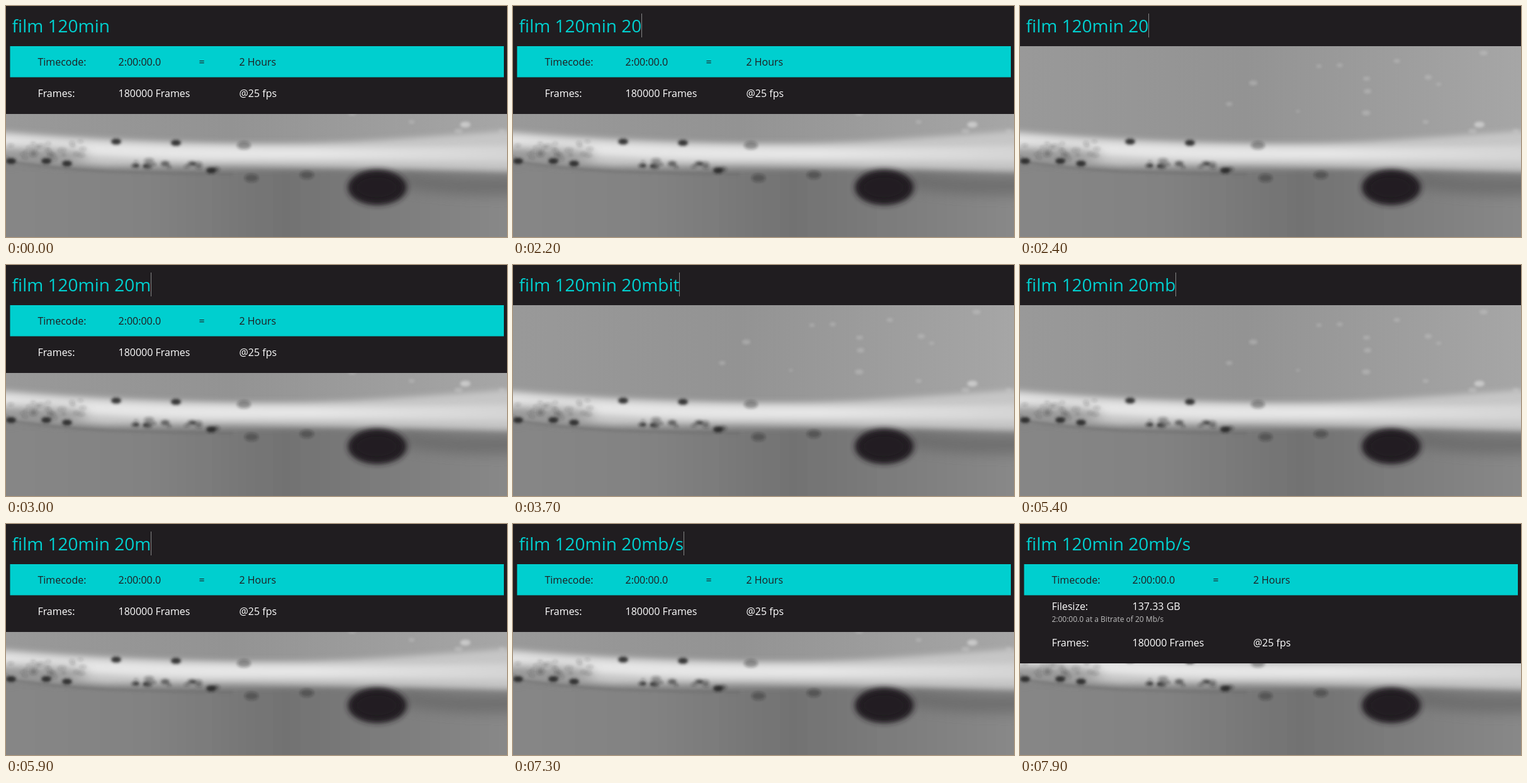
Animation, 796 px wide and 368 px high, one loop 8 s. Source, as an HTML page:

```html
<!DOCTYPE html>
<html lang="en">
<head>
<meta charset="utf-8">
<title>Film calculator</title>
<style>
  html, body { margin: 0; width: 100%; height: 100%; overflow: hidden; background: #201d20; }
  #stage { position: absolute; left: 0; top: 0; width: 796px; height: 368px; overflow: hidden;
           font-family: "Open Sans", "Noto Sans", sans-serif; }
  svg { position: absolute; left: 0; top: 0; display: block; }
  #query { position: absolute; left: 9.6px; top: 12px; height: 38px; line-height: 38px;
           font-size: 28px; white-space: pre; color: #00cfcf; }
  #caret { position: absolute; top: 0; width: 1px; height: 38px; background: #858585; }
  #rows text { font-size: 16px; fill: #fff; }
  #rows .picked text { fill: #201d20; }
  #rows .note { font-size: 12px; fill: #bdbdbd; }
</style>
</head>
<body>
<div id="stage">
  <svg width="796" height="368" viewBox="0 0 796 368">
    <defs>
      <linearGradient id="sky" x2="1" y2="0">
        <stop offset="0" stop-color="#999"/>
        <stop offset=".45" stop-color="#939393"/>
        <stop offset="1" stop-color="#a6a6a6"/>
      </linearGradient>
      <linearGradient id="ground" x2="1" y2="0">
        <stop offset="0" stop-color="#878787"/>
        <stop offset=".3" stop-color="#828282"/>
        <stop offset=".55" stop-color="#727272"/>
        <stop offset="1" stop-color="#8b8b8b"/>
      </linearGradient>
      <linearGradient id="core" x2="1" y2="0">
        <stop offset=".6" stop-color="#e6e6e6"/>
        <stop offset="1" stop-color="#d2d2d2"/>
      </linearGradient>
      <filter id="soft2" x="-50%" y="-50%" width="200%" height="200%"><feGaussianBlur stdDeviation="2"/></filter>
      <filter id="soft5" x="-50%" y="-50%" width="200%" height="200%"><feGaussianBlur stdDeviation="5"/></filter>
      <filter id="soft9" x="-50%" y="-80%" width="200%" height="260%"><feGaussianBlur stdDeviation="9"/></filter>
    </defs>

    <g id="photo">
      <rect width="796" height="368" fill="url(#sky)"/>
      <path d="M-40 246 Q180 262 400 260 T840 266 V410 H-40Z" fill="url(#ground)" filter="url(#soft5)"/>
      <path d="M630 264 Q720 276 840 270 V300 Q720 306 630 290Z" fill="#666" opacity=".7" filter="url(#soft9)"/>
      <path d="M-40 196 Q120 212 300 217 Q470 222 600 213 T840 196 V262 Q640 258 480 255 T160 254 Q60 246 -40 244Z"
            fill="#c6c6c6" filter="url(#soft5)"/>
      <path d="M-40 203 Q150 222 330 224 Q500 228 840 222 V248 Q560 244 330 245 Q150 244 -40 222Z"
            fill="url(#core)" filter="url(#soft5)"/>
      <ellipse cx="40" cy="239" rx="90" ry="11" fill="#777" opacity=".7" filter="url(#soft9)"/>
      <path d="M0 247 Q90 262 200 265 T360 268" fill="none" stroke="#666" stroke-width="3"
            opacity=".55" filter="url(#soft2)"/>
      <g id="pale" fill="#d2d2d2" filter="url(#soft2)"></g>
      <g id="dark" fill="#222" filter="url(#soft2)"></g>
      <ellipse cx="590" cy="289" rx="47" ry="28" fill="#201d20" filter="url(#soft5)"/>
      <ellipse cx="589" cy="289" rx="37" ry="21" fill="#201d20" filter="url(#soft5)"/>
    </g>

    <rect id="panel" width="796" fill="#201d20"/>
    <g id="rows">
      <g class="picked">
        <rect x="6.5" y="64" width="784.5" height="49.5" fill="#00cfcf"/>
        <text x="50.4" y="95">Timecode:</text>
        <text x="178.5" y="95">2:00:00.0</text>
        <text x="306.4" y="95">=</text>
        <text x="370.4" y="95">2 Hours</text>
      </g>
      <g id="size">
        <text x="50.4" y="137">Filesize:</text>
        <text x="178.5" y="137">137.33 GB</text>
        <text class="note" x="50.4" y="156">2:00:00.0 at a Bitrate of 20 Mb/s</text>
      </g>
      <g id="frames">
        <text x="50.4" y="145">Frames:</text>
        <text x="178.5" y="145">180000 Frames</text>
        <text x="370.4" y="145">@25 fps</text>
      </g>
    </g>
  </svg>
  <div id="query"><span id="typed"></span><span id="caret"></span></div>
</div>
<script>
const LOOP = 8000, BLINK = 500;
const $ = id => document.getElementById(id);

// Photo flecks
let seed = 7;
const random = () => (seed = seed * 16807 % 2147483647) / 2147483647;
const between = (a, b) => a + (b - a) * random();

function fleck(id, x, y, r, opacity) {
  const spot = document.createElementNS('http://www.w3.org/2000/svg', 'ellipse');
  const shape = { cx: x, cy: y, rx: r, ry: r * 0.6, opacity };
  for (const name in shape) spot.setAttribute(name, shape[name]);
  $(id).append(spot);
}

const lowerEdge = x => 243 + x * 0.045;
for (let i = 0; i < 26; i++) {
  const x = between(0, 130);
  fleck('dark', x, between(214, lowerEdge(x)), between(3, 7), 0.16);
}
for (let i = 0; i < 16; i++) {
  const x = between(205, 350);
  fleck('dark', x, lowerEdge(x) + between(-7, 3), between(3, 8), between(0.25, 0.6));
}
for (let i = 0; i < 16; i++) fleck('pale', between(240, 796), between(70, 200), between(3, 7), 0.35);

const blots = [[97, 251], [64, 247], [8, 247], [270, 218], [175, 216], [326, 262]];
for (const [x, y] of blots) fleck('dark', x, y, 8, 0.85);
for (const [x, y] of [[390, 274], [478, 269], [378, 222]]) fleck('dark', x, y, 11, 0.35);
fleck('pale', 730, 189, 8, 0.8);

// Keystrokes: '<' deletes, '' only wakes the caret
const keys = [[100, ''], [400, ''], [1900, '2'], [2200, '0'], [2800, 'm'], [3400, 'b'], [3500, 'i'],
  [3600, 't'], [5100, '<'], [5400, '<'], [5600, '<'], [6300, 'b'], [6600, ''], [7000, '/'], [7300, 's']];
// Number of result rows from each time on
const results = [[0, 2], [2300, 0], [3000, 2], [3500, 0], [3800, 3], [5400, 0], [5700, 2], [7900, 3]];

const until = (line, t) => line.filter(([start]) => start <= t);
const press = (text, [, key]) => key === '<' ? text.slice(0, -1) : text + key;

function draw(t) {
  const pressed = until(keys, t);
  const text = pressed.reduce(press, 'film 120min ');
  const idle = pressed.length ? t - pressed.at(-1)[0] : BLINK;
  const count = until(results, t).at(-1)[1];

  if ($('typed').textContent !== text) $('typed').textContent = text;
  $('caret').style.opacity = idle % (2 * BLINK) < BLINK ? 1 : 0;
  $('panel').setAttribute('height', count ? 72 + 50 * count : 64);
  $('rows').style.display = count ? '' : 'none';
  $('size').style.display = count === 3 ? '' : 'none';
  $('frames').setAttribute('transform', `translate(0 ${count === 3 ? 50 : 0})`);
}

const begin = performance.now();
function tick() {
  draw((performance.now() - begin) % LOOP);
  requestAnimationFrame(tick);
}
tick();
</script>
</body>
</html>
```
